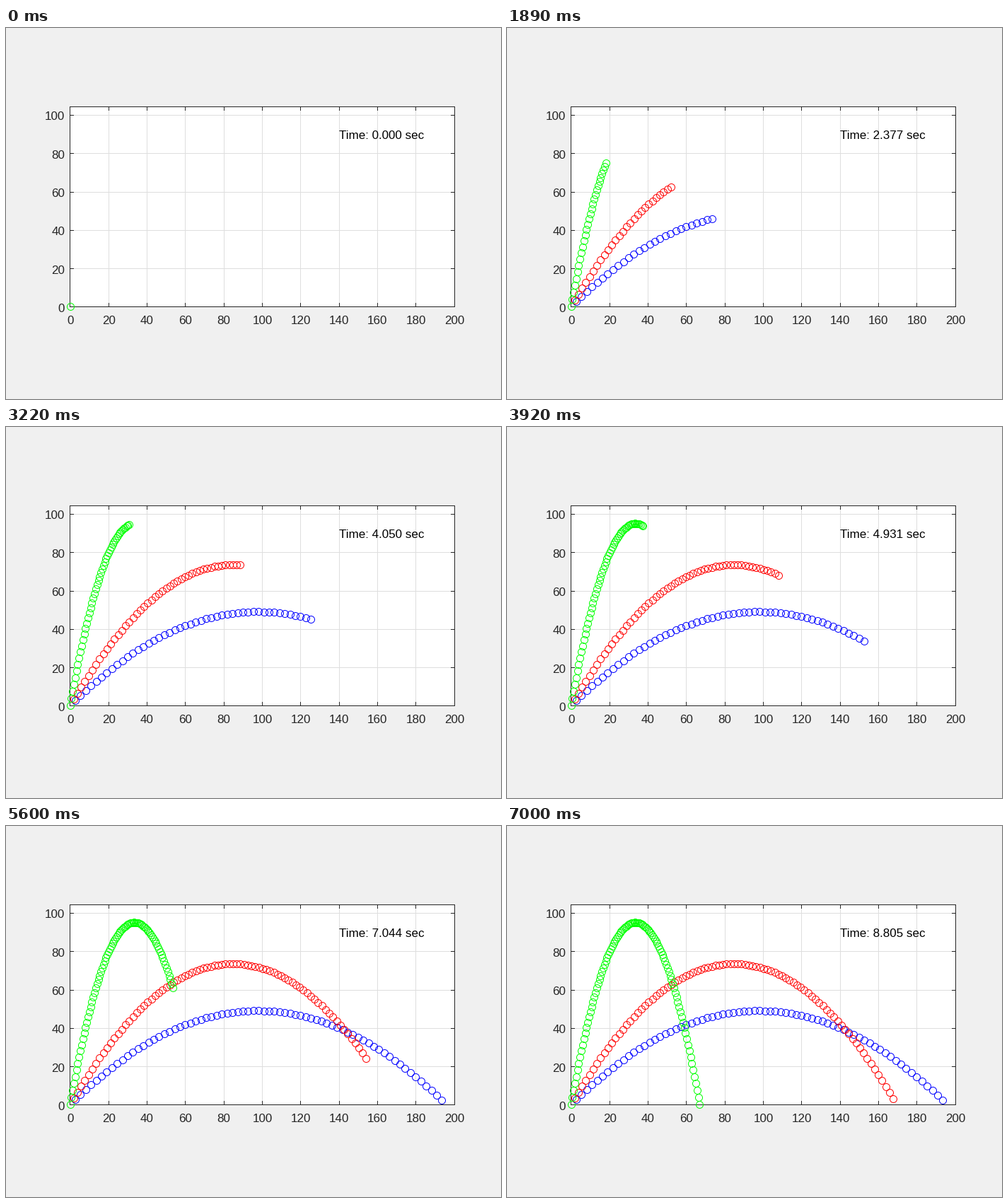
Write a matplotlib script that moves like this. It is 700 px wide and 525 px high and loops after 7070 ms.

```python
import math

import matplotlib.pyplot as plt
from matplotlib.animation import FuncAnimation
from matplotlib.patches import Circle, Rectangle

W, H, DPI = 700, 525, 100
PX = 72 / DPI                      # one pixel in points
FRAMES, INTERVAL = 101, 70

# plot area in pixels, y pointing down
LEFT, RIGHT, TOP, BOTTOM = 90, 634, 111, 394
DATA = (91.01, 394.83, 2.7125)     # origin and scale of the markers
RULER = (90.85, 394.98, 2.716)     # origin and scale of ticks and grid
INK = (0.15, 0.15, 0.15)
GRID = (0.8725, 0.8725, 0.8725)
FONT = 17
DIGIT = 0.556 * FONT               # advance width of one digit

SPEED, G = 43.854, 9.81
SHOTS = [(45, "#0000ff", 1), (60, "#ff0000", 1), (80, "#00ff00", 0)]
FLIGHT = 2 * SPEED * math.sin(math.radians(80)) / G
DT = FLIGHT / (FRAMES - 1)

plt.rcParams["font.family"] = "Liberation Sans"
plt.rcParams["font.size"] = FONT * PX

fig = plt.figure(figsize=(W / DPI, H / DPI), dpi=DPI, facecolor="#f0f0f0")
ax = fig.add_axes([0, 0, 1, 1])
ax.set_xlim(0, W)
ax.set_ylim(H, 0)
ax.axis("off")


def place(x, y, frame):
    x0, y0, scale = frame
    return x0 + x * scale, y0 - y * scale


def line(x1, y1, x2, y2, color, z):
    """One pixel wide line; snapping moves it to the pixel centres."""
    ax.plot([x1, x2], [y1, y2], color=color, lw=PX,
            solid_capstyle="projecting", snap=True, zorder=z)


def label(x, y, text, color=INK):
    return ax.text(x, y, text, color=color, ha="left", va="baseline",
                   zorder=5)


def draw_axes():
    ax.add_patch(Rectangle((LEFT, TOP), RIGHT - LEFT, BOTTOM - TOP,
                           fc="white", ec="none", zorder=0))
    for v in range(0, 201, 20):
        pos = place(v, 0, RULER)[0]
        x = math.floor(pos)
        line(x, TOP, x, BOTTOM, GRID, 1)
        line(x, BOTTOM, x, BOTTOM - 5, INK, 2)
        line(x, TOP, x, TOP + 5, INK, 2)
        label(pos - len(str(v)) * DIGIT / 2, 419, str(v))
    for v in range(0, 101, 20):
        pos = place(0, v, RULER)[1]
        y = math.floor(pos)
        line(LEFT, y, RIGHT, y, GRID, 1)
        line(LEFT, y, LEFT + 5, y, INK, 2)
        line(RIGHT, y, RIGHT - 5, y, INK, 2)
        label(83.2 - len(str(v)) * DIGIT, round(pos + 7), str(v))
    for y in (TOP, BOTTOM):
        line(LEFT, y, RIGHT, y, INK, 2)
    for x in (LEFT, RIGHT):
        line(x, TOP, x, BOTTOM, INK, 2)


def make_rings():
    """Rings of all shots as (step, patch); later steps lie on top."""
    rings = []
    for k in range(FRAMES):
        t = k * DT
        for angle, color, first in SHOTS:
            a = math.radians(angle)
            x = SPEED * math.cos(a) * t
            y = SPEED * math.sin(a) * t - G * t * t / 2
            if k < first or y < -1e-6:
                continue
            cx, cy = (math.floor(p) + 0.5 for p in place(x, y, DATA))
            ring = Circle((cx, cy), 5, fc="none", ec=color,
                          lw=PX, zorder=3 + k / FRAMES)
            rings.append((k, ax.add_patch(ring)))
    return rings


draw_axes()
rings = make_rings()
clock = label(place(140, 0, DATA)[0], 157, "", "black")


def update(frame):
    for k, ring in rings:
        ring.set_visible(k <= frame)
    clock.set_text(f"Time: {frame * DT:.3f} sec")
    return [clock]


anim = FuncAnimation(fig, update, frames=FRAMES, interval=INTERVAL,
                     repeat=True, repeat_delay=0, blit=False)
plt.show()
```
